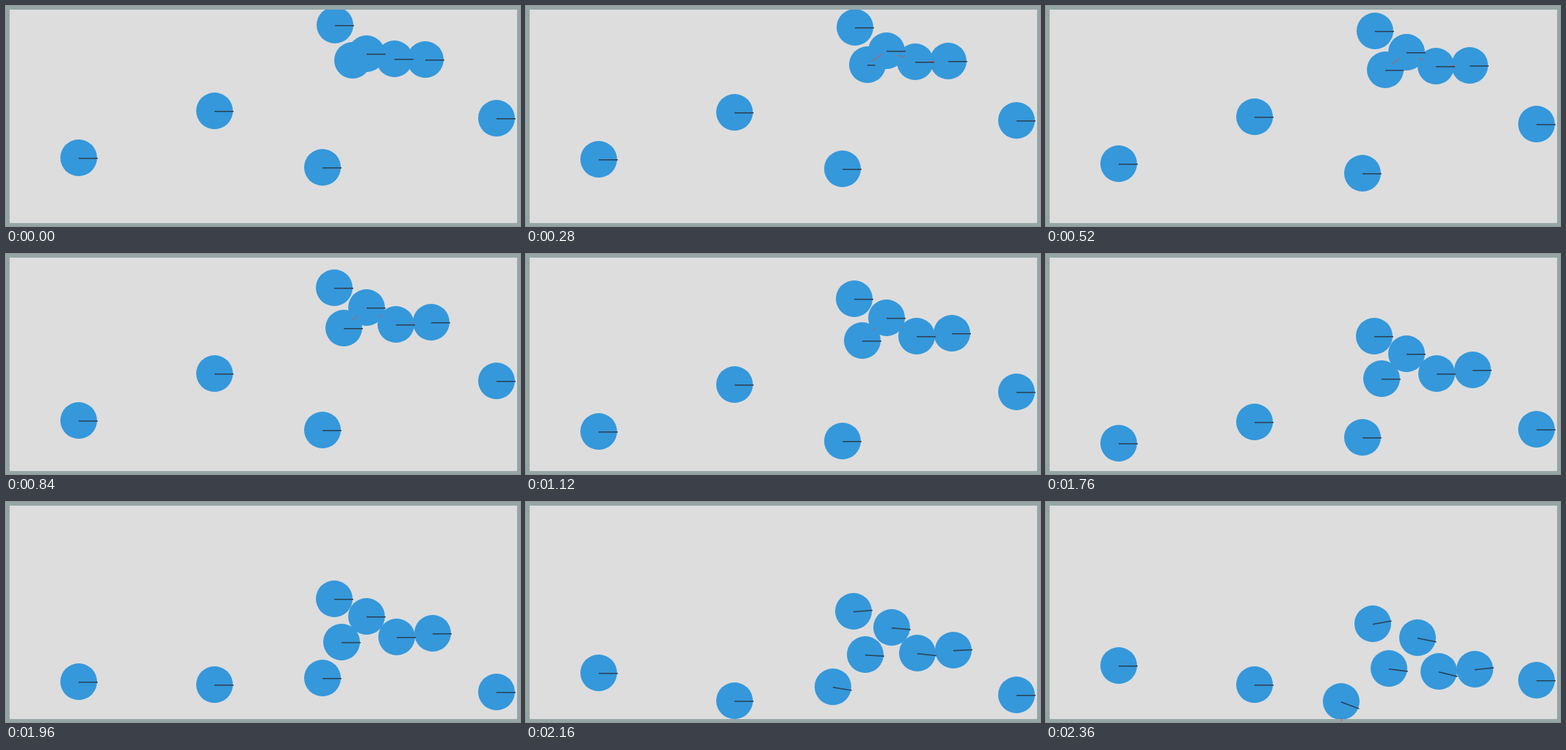
These frames come from a looping animation (700x300 px, 2400 ms). An HTML page with a canvas:

```html
<!DOCTYPE html>
<html>
<head>
<meta charset="utf-8">
<style>
html, body { margin: 0; width: 700px; height: 300px; overflow: hidden; background: #ddd; }
canvas { display: block; }
</style>
</head>
<body>
<canvas id="stage" width="700" height="300"></canvas>
<script>
const ctx = document.getElementById('stage').getContext('2d');
const R = 25, STEP = 40, STEPS = 60, HIT = 50;
const WALL = { top: 5, left: 5, right: 696, bottom: 296 };

const fall = n => 0.0432 * (n * n + n);
const settle = (from, to, k, n) => to + (from - to) * Math.exp(-n / k);

// free fall with one elastic bounce at the given step
const bouncer = (x, y, bounce) => n => ({
  x, y: y + fall(n > bounce ? n - 2 * bounce - 1 : n), a: 0
});

// overlapping balls ease apart: [from, to, rate] per axis
const pile = (px, py) => n => ({
  x: settle(...px, n), y: settle(...py, n) + fall(n), a: 0
});

// straight throw and spin after the shared collision
const struck = (before, vx, vy, turn) => n => {
  if (n <= HIT) return before(n);
  const p = before(HIT), m = n - HIT;
  return { x: p.x + vx * m, y: p.y + vy * m + fall(m), a: turn / 9 * m * Math.PI / 180 };
};

const balls = [
  struck(pile([571, 581.2, 13], [72.9, 72.9, 1]), 0.32, 4.54, -6),
  struck(pile([529, 532, 13], [72, 79, 28]), 0.33, 4.31, 14),
  struck(pile([472, 457, 12], [74, 86, 22]), 1.08, 3.08, 7),
  struck(pile([491, 490.8, 9], [65, 50.3, 12]), 1.69, 2.28, 11),
  struck(pile([447.9, 447, 25], [26.4, 26.4, 1]), -0.25, 2.83, -10),
  struck(bouncer(431, 220, 35), -3.22, 3.33, 20.5),
  bouncer(99, 207, 39),
  bouncer(284, 143, 54),
  bouncer(668, 153.1, 52)
];

function line(x1, y1, x2, y2) {
  ctx.beginPath();
  ctx.moveTo(x1, y1);
  ctx.lineTo(x2, y2);
  ctx.stroke();
}

function drawBall({ x, y, a }) {
  ctx.fillStyle = '#3498db';
  ctx.beginPath();
  ctx.arc(x, y, R, 0, Math.PI * 2);
  ctx.fill();
  ctx.strokeStyle = '#2c3e50';
  ctx.lineWidth = 1.5;
  const sy = y + 0.75;
  line(x, sy, x + 26 * Math.cos(a), sy + 26 * Math.sin(a));
}

function drawWalls() {
  ctx.fillStyle = '#95a5a6';
  ctx.fillRect(0, 0, 700, WALL.top);
  ctx.fillRect(0, 0, WALL.left, 300);
  ctx.fillRect(WALL.right, 0, 4, 300);
  ctx.fillRect(0, WALL.bottom, 700, 4);
}

function drawContacts(list) {
  ctx.strokeStyle = '#e74c3c';
  ctx.lineWidth = 1;
  list.forEach((p, i) => {
    if (p.y - R < WALL.top) line(p.x + 0.5, p.y - R + 1, p.x + 0.5, WALL.top);
    if (p.y + R > WALL.bottom) line(p.x + 0.5, WALL.bottom - 1, p.x + 0.5, 299);
    for (const q of list.slice(i + 1)) {
      const dx = q.x - p.x, dy = q.y - p.y, d = Math.hypot(dx, dy);
      if (d >= 2 * R) continue;
      const ux = dx / d, uy = dy / d;
      line(p.x + ux * R, p.y + uy * R, q.x - ux * R, q.y - uy * R);
    }
  });
}

function draw(n) {
  ctx.fillStyle = '#ddd';
  ctx.fillRect(0, 0, 700, 300);
  const list = balls.map(at => {
    const p = at(n);
    return { x: Math.round(p.x), y: Math.round(p.y), a: p.a };
  });
  list.forEach(drawBall);
  drawWalls();
  if (n > 0) drawContacts(list);
}

function tick() {
  draw(Math.floor(performance.now() / STEP) % STEPS);
  requestAnimationFrame(tick);
}
tick();
</script>
</body>
</html>
```
